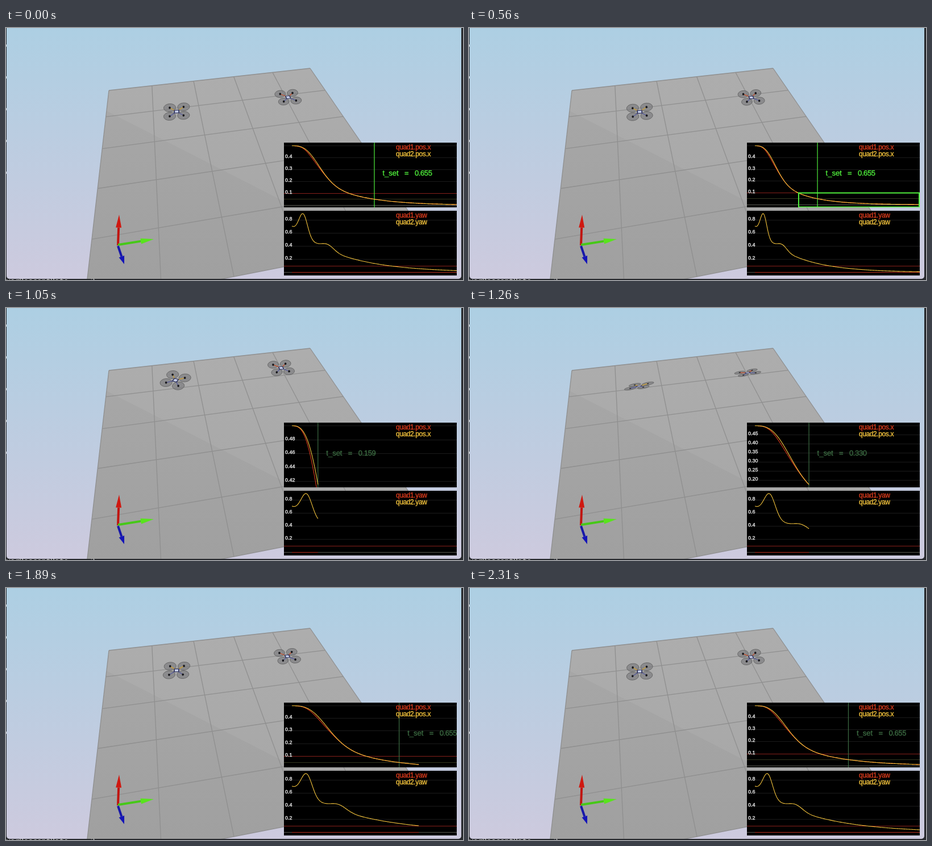
These frames come from a looping animation (804 px wide and 444 px high, 2380 ms). An HTML page with a canvas:

```html
<!DOCTYPE html>
<html>
<head>
<meta charset="utf-8">
<title>Quadcopter step response</title>
<style>
html, body { margin: 0; width: 100%; height: 100%; overflow: hidden; background: #26282c; }
canvas { display: block; }
</style>
</head>
<body>
<canvas id="stage" width="804" height="444"></canvas>
<script>
const c = document.getElementById('stage').getContext('2d');
const LOOP = 2380, STEP = 70, RESET = 840, BOX_ON = 280;
const SANS = '"Liberation Sans", Arial, sans-serif';
const RED = '#d83a1c', YELLOW = '#f2c23c', GREEN = '#50f03c', DIM = '#3c6b42';
const SETTLE = 0.655, ENTER = 0.458;

// Simulation seconds at each animation time
const CLOCK = [[0, 1.31], [560, 1.726], [839, 1.93], [840, 0.01], [910, 0.045], [1260, 0.33],
  [1610, 0.535], [1890, 0.775], [2310, 1.155]];

function simTime(ms) {
  let i = 0;
  while (i < CLOCK.length - 2 && ms >= CLOCK[i + 1][0]) i++;
  const [a, ta] = CLOCK[i], [b, tb] = CLOCK[i + 1];
  return ta + (tb - ta) * (ms - a) / (b - a);
}

const bell = (t, mid, width) => Math.exp(-(((t - mid) / width) ** 2));

// Responses: exponential decay with a soft start, and decay plus two swings
const pos2 = t => 0.5 * Math.exp(-(3.2 * t + 0.19) * (1 - Math.exp(-((t / 0.26) ** 2.4))));
const pos1 = t => pos2(t + 0.012 * bell(t, 0.15, 0.1));
const yaw1 = () => 0;
const yaw2 = t => 0.7 * Math.exp(-2.5 * t) + 0.34 * bell(t, 0.09, 0.048) + 0.085 * bell(t, 0.285, 0.07);

// Apparent depth of a rotor disc: leans in first, then brakes
const lean = t => 1 + 0.5 * t / 0.06 * Math.exp(1 - t / 0.06) - 0.7 * bell(t, 0.33, 0.17);

function line(x0, y0, x1, y1, color, width = 1) {
  c.strokeStyle = color;
  c.lineWidth = width;
  c.beginPath();
  c.moveTo(x0, y0);
  c.lineTo(x1, y1);
  c.stroke();
}

function row(y, color) {
  const mid = Math.floor(y) + 0.5;
  line(489, mid, 793, mid, color);
}

function poly(color, ...points) {
  c.fillStyle = color;
  c.beginPath();
  for (const [x, y] of points) c.lineTo(x, y);
  c.fill();
}

function text(s, x, y, size, color, spacing = 0, weight = 0.35) {
  c.font = `${size}px ${SANS}`;
  c.letterSpacing = spacing + 'px';
  c.fillStyle = c.strokeStyle = color;
  c.lineWidth = weight;
  c.fillText(s, x, y);
  c.strokeText(s, x, y);
}

function gradient(y0, y1, a, b) {
  const g = c.createLinearGradient(0, y0, 0, y1);
  g.addColorStop(0, a);
  g.addColorStop(1, b);
  return g;
}

// Perspective map from the unit square to the floor
function quadMap([x0, y0], [x1, y1], [x2, y2], [x3, y3]) {
  const ax = x1 - x2, ay = y1 - y2, bx = x3 - x2, by = y3 - y2;
  const sx = x0 - x1 + x2 - x3, sy = y0 - y1 + y2 - y3, d = ax * by - bx * ay;
  const g = (sx * by - bx * sy) / d, h = (ax * sy - sx * ay) / d;
  return (u, v) => {
    const w = 1 + g * u + h * v;
    return [(x0 + (x1 - x0 + g * x1) * u + (x3 - x0 + h * x3) * v) / w,
      (y0 + (y1 - y0 + g * y1) * u + (y3 - y0 + h * y3) * v) / w];
  };
}
const floor = quadMap([181, 110], [535, 71], [741, 371], [137.5, 490]);

function arrow(x, y, tipX, tipY, color, shade) {
  const len = Math.hypot(tipX - x, tipY - y), ux = (tipX - x) / len, uy = (tipY - y) / len;
  const head = Math.min(23, len * 0.42), bx = tipX - ux * head, by = tipY - uy * head;
  line(x, y, bx, by, shade, 4);
  poly(color, [tipX, tipY], [bx - uy * 5, by + ux * 5], [bx + uy * 5, by - ux * 5]);
}

function scene() {
  c.fillStyle = '#26282c';
  c.fillRect(0, 0, 804, 444);
  c.font = '13px "DejaVu Sans Mono", monospace';
  c.letterSpacing = '0px';
  c.fillStyle = '#c8c8c8';
  c.fillText('yorDescentRate   = 2', 0, 450);
  for (let y = 29; y < 270; y += 56) c.fillRect(0, y, 1, 4);

  c.save();
  c.beginPath();
  c.roundRect(1, 0, 800, 442, [0, 0, 5, 5]);
  c.clip();
  c.fillStyle = gradient(0, 442, '#adcfe3', '#cdcade');
  c.fillRect(0, 0, 804, 444);
  poly(gradient(80, 442, '#adadad', '#a5a5a5'), floor(0, 0), floor(1, 0), floor(1, 1), floor(0, 1));
  poly('rgba(0,0,0,0.03)', [177, 146], [490, 306], [490, 420], floor(0, 1));
  for (let i = 0; i <= 5; i++) {
    const k = i / 5;
    line(...floor(k, 0), ...floor(k, 1), '#8f8f8f', 1.3);
    line(...floor(0, k), ...floor(1, k), '#8f8f8f', 1.3);
  }
  arrow(197, 383, 199, 329, '#d01810', '#c01410');
  arrow(197, 382, 260, 372, '#58e41c', '#46c818');
  arrow(197, 384, 208, 416, '#1414b8', '#1818a8');
  c.restore();
}

// (x, y) is the resting place, (dx, dy) the way back to the start
function drone(t, x, y, dx, dy, size, skew, yaw, color) {
  const away = (pos2(t) / 0.5) ** 0.8, k = lean(t);
  const cx = x - dx * away, cy = y - dy * away;
  const side = [12.2 * size, (1.8 * k - 2.8) * size], front = [skew, -7.5 * size * k];
  const cos = Math.cos(yaw), sin = Math.sin(yaw);
  const place = (r, f, scale = 1) => {
    const a = (r * cos + f * sin) * scale, b = (f * cos - r * sin) * scale;
    return [cx + a * side[0] + b * front[0], cy + a * side[1] + b * front[1]];
  };
  const corners = [[-1, 1], [1, 1], [1, -1], [-1, -1]];
  const turn = Math.atan2(side[1], side[0]);

  function disc([px, py], rx, ry, fill) {
    c.fillStyle = fill;
    c.beginPath();
    c.ellipse(px, py, rx, ry, turn, 0, 7);
    c.fill();
  }
  for (const [r, f] of corners) {
    disc(place(r, f), 10.6 * size, 7 * size * k, 'rgba(120,120,122,0.62)');
    c.strokeStyle = '#686868';
    c.lineWidth = 1;
    c.stroke();
  }
  for (const [r, f] of corners) {
    line(cx, cy, ...place(r, f), f > 0 ? color : '#585c9c', 1.3);
    disc(place(r, f), 1.8, Math.min(2, 2.2 * k), '#18181c');
  }
  poly('#30345c', ...corners.map(([r, f]) => place(r, f, 0.4)));
  poly('#c4cce8', ...corners.map(([r, f]) => place(r, f, 0.25)));
}

function curve(f, t, X, Y, color) {
  c.strokeStyle = color;
  c.lineWidth = 1.1;
  c.beginPath();
  for (let i = 0; i <= 240; i++) c.lineTo(X(t * i / 240), Y(f(t * i / 240)));
  c.stroke();
}

function niceStep(range) {
  const e = 10 ** Math.floor(Math.log10(range / 7));
  return [1, 2, 5, 10].find(m => m * e * 7 >= range) * e;
}

function panel(top, name, step, Y, lo, hi, draw) {
  c.save();
  c.beginPath();
  c.rect(489, top, 304, 114);
  c.clip();
  c.fillStyle = '#000';
  c.fillRect(489, top, 304, 114);
  const digits = Math.max(1, -Math.floor(Math.log10(step) + 1e-6));
  const values = [];
  for (let i = Math.ceil(lo / step - 0.3); i * step <= hi + 1e-9; i++) values.push(i * step);
  for (const v of values) row(Y(v), '#1b1b1b');
  row(Y(0), '#585850');
  row(Y(0.1), '#86201a');
  draw();
  for (const v of values) {
    if (v > 1e-9 && Y(v) > top + 10) text(v.toFixed(digits), 491, Y(v) + 0.5, 9, '#f0f0f0');
  }
  text('quad1.' + name, 686, top + 12, 12, RED, -0.4);
  text('quad2.' + name, 686, top + 24, 12, YELLOW, -0.4);
  c.restore();
}

function plots(ms, t) {
  const bright = ms < RESET, mark = bright ? GREEN : DIM;
  const X = s => 503 + 290 * s / Math.max(1.007, t);
  const range = 0.5 - pos2(t);
  const Yp = v => 207.5 + (0.5 - v) / range * 103.5;
  panel(202, 'pos.x', niceStep(range), Yp, 0.5 - range, 0.5, () => {
    row(Yp(0.05), '#33361f');
    const set = Math.min(t, SETTLE), x = X(set);
    line(x, 202, x, 316, mark, 1.2);
    curve(pos1, t, X, Yp, RED);
    curve(pos2, t, X, Yp, YELLOW);
    text('t_set', x + 14.5, 259.5, 13, mark);
    text('=', x + 53, 259.5, 13, mark);
    text(set.toFixed(3), x + 71, 259.5, 13, mark, -0.4);
    if (bright && ms >= BOX_ON) {
      const left = X(ENTER), y = Yp(0.1);
      c.strokeStyle = GREEN;
      c.lineWidth = 2;
      c.strokeRect(left, y, 792 - left, 315.5 - y);
    }
  });

  const top = yaw2(Math.min(t, 0.088));
  const Yy = v => 430.5 - v / top * 103.5;
  panel(322, 'yaw', 0.2, Yy, 0, top, () => {
    curve(yaw1, t, X, Yy, '#b83020');
    curve(yaw2, t, X, Yy, YELLOW);
  });
}

const start = performance.now();

function frame() {
  const ms = Math.floor((performance.now() - start) % LOOP / STEP) * STEP;
  const t = simTime(ms);
  scene();
  drone(t, 300.3, 148, 2.5, 24, 1, -0.3, yaw2(t), '#d0a030');
  drone(t, 496.8, 122.6, 14.8, 19.6, 0.89, -3.2, yaw1(t), '#c8502c');
  plots(ms, t);
  requestAnimationFrame(frame);
}
frame();
</script>
</body>
</html>
```
